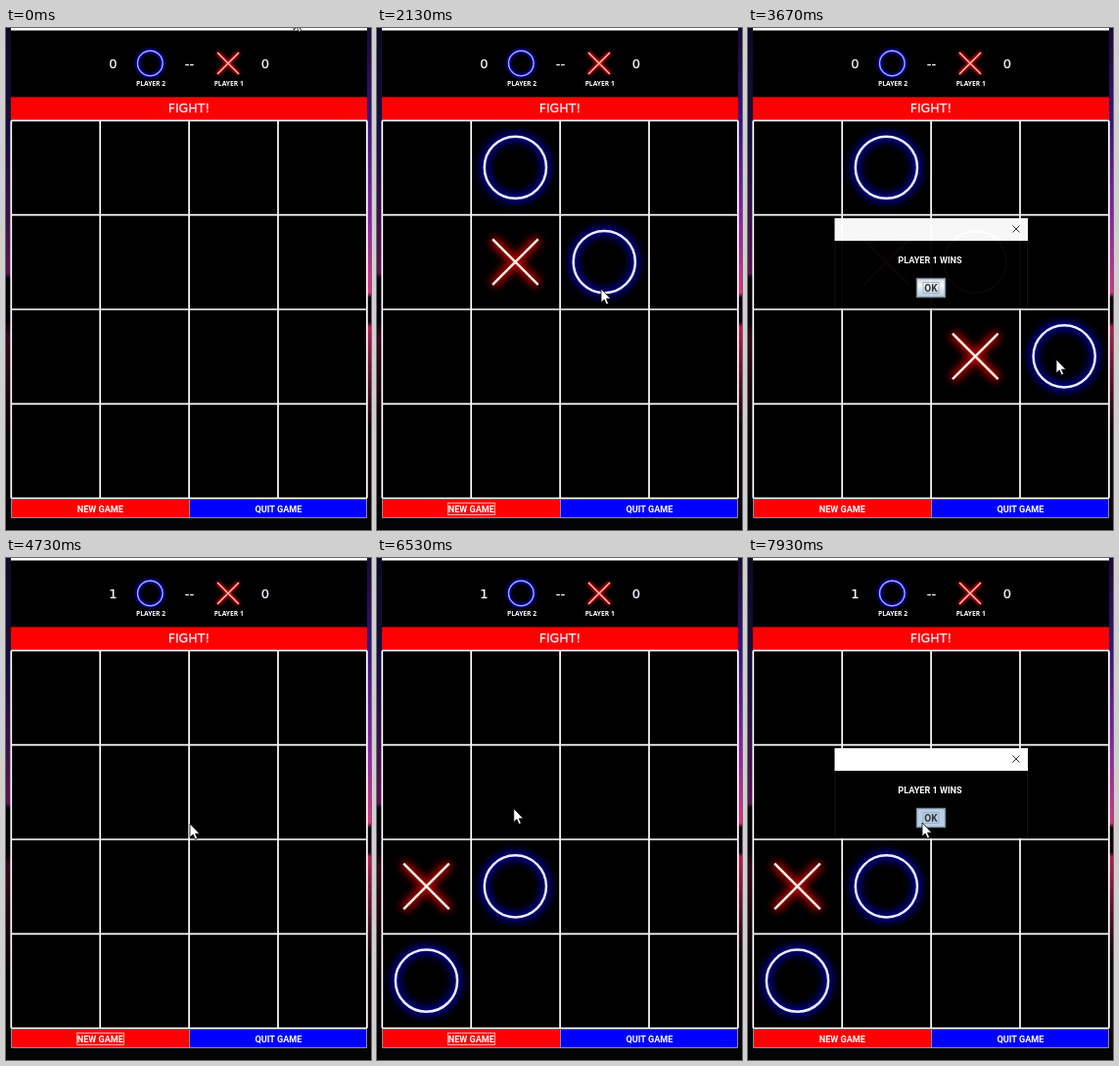
Write an HTML page that moves like this. It is 373 by 512 pixels and loops after 8 s.

```html
<!DOCTYPE html>
<html lang="en">
<head>
<meta charset="utf-8">
<title>Neon tic-tac-toe</title>
<style>
  html, body { margin: 0; width: 100%; height: 100%; overflow: hidden; background: #000; }
  svg { display: block; width: 373px; height: 512px; }
  text { fill: #fff; text-anchor: middle; font: bold 9.1px Roboto, sans-serif; }
  .big { font: 13px "DejaVu Sans", sans-serif; fill: #f2f2ff; stroke: #f2f2ff; stroke-width: .25; }
  .tag { font: bold 6.7px "Open Sans", sans-serif; }
  .line { fill: none; stroke-width: 2.5; }
  .halo { fill: none; stroke-width: 9; filter: url(#blur); }
  .O .line { stroke: #ececff; }
  .O .halo { stroke: #00009c; }
  .X .line { stroke: #fff0ea; }
  .X .halo { stroke: #b80000; }
  .icon .line { stroke-width: 1.4; }
  .icon .halo { stroke-width: 4; filter: url(#soft); }
  .icon.O .line { stroke: #a8a8ff; }
  .icon.O .halo { stroke: #0000c8; }
  .icon.X .line { stroke: #ffc4c0; }
  .icon.X .halo { stroke: #d80000; }
</style>
</head>
<body>
<svg viewBox="0 0 373 512">
  <defs>
    <filter id="blur" x="-50%" y="-50%" width="200%" height="200%"><feGaussianBlur stdDeviation="4"/></filter>
    <filter id="soft" x="-50%" y="-50%" width="200%" height="200%"><feGaussianBlur stdDeviation="1.8"/></filter>
    <linearGradient id="left" x2="0" y2="1">
      <stop offset="0" stop-color="#0c0a26"/><stop offset=".25" stop-color="#1b0e42"/>
      <stop offset=".5" stop-color="#5a1450"/><stop offset=".51" stop-color="#050208"/>
      <stop offset=".6" stop-color="#08030a"/><stop offset=".63" stop-color="#34081c"/>
      <stop offset=".85" stop-color="#050306"/>
    </linearGradient>
    <linearGradient id="right" x2="0" y2="1">
      <stop offset="0" stop-color="#170a34"/><stop offset=".2" stop-color="#3c1480"/>
      <stop offset=".4" stop-color="#9420ae"/><stop offset=".54" stop-color="#e0307c"/>
      <stop offset=".55" stop-color="#0a0308"/><stop offset=".6" stop-color="#10040a"/>
      <stop offset=".61" stop-color="#b81a50"/><stop offset=".82" stop-color="#0c0408"/>
    </linearGradient>
    <linearGradient id="metal" x2="0" y2="1">
      <stop offset="0" stop-color="#d4e0ec"/><stop offset=".35" stop-color="#fff"/>
      <stop offset="1" stop-color="#b8cfe5"/>
    </linearGradient>
  </defs>

  <rect width="373" height="512" fill="#040306"/>
  <rect width="5" height="500" fill="url(#left)"/>
  <rect x="369" width="4" height="500" fill="url(#right)"/>
  <rect x="5" width="364" height="500"/>
  <rect x="5" width="364" height="2.5" fill="#fff"/>

  <g id="icons"></g>
  <text id="score" class="big" x="109.5" y="41.3">0</text>
  <text class="big" x="187.5" y="41.3">--</text>
  <text class="big" x="265" y="41.3">0</text>
  <text class="tag" x="148" y="59.4">PLAYER 2</text>
  <text class="tag" x="227.7" y="59.4">PLAYER 1</text>
  <rect x="5" y="70.4" width="364" height="23" fill="#f00"/>
  <text class="big" x="187" y="86.4" style="font-size:12.5px">FIGHT!</text>

  <path id="grid" fill="none" stroke="#fff" stroke-width="1.7"/>
  <rect x="5.5" y="481" width="181.5" height="18" fill="#f00"/>
  <rect x="187" y="481" width="181.5" height="18" fill="#00f"/>
  <path d="M5.5 480V499.5H368.5V480M187.5 481V499" fill="none" stroke="#8c8c96"/>
  <text x="96.3" y="494">NEW GAME</text>
  <text x="278.5" y="494">QUIT GAME</text>
  <rect id="focus" x="72.5" y="484.5" width="48" height="12" fill="none" stroke="#ffb4b4" stroke-width=".9"/>

  <g id="board"></g>

  <g id="dialog">
    <rect x="88.5" y="194" width="197.5" height="92"/>
    <path d="M89 217V285.5H285.5V217" fill="none" stroke="#141414"/>
    <rect x="88.5" y="194" width="197.5" height="23" fill="#fff"/>
    <path d="M270.5 201.5l7 7m0-7l-7 7" stroke="#333"/>
    <text x="186" y="240.3">PLAYER 1 WINS</text>
    <rect id="ok" x="172.5" y="255.5" width="29" height="19" stroke="#7a8a99" stroke-width="1.4"/>
    <rect x="179" y="259.5" width="16" height="11" fill="none" stroke="#8faacb" stroke-width=".8"/>
    <text x="187" y="268.8" style="font-size:10px;fill:#333">OK</text>
  </g>
  <path id="cursor" d="M0 0V14L3.2 11L5.4 16L7.6 15L5.5 10.2H9.8Z" fill="#fff" stroke="#000" stroke-width=".8"/>
</svg>

<script>
const FPS = 15, TICKS = 120;
const LEFT = 5.3, TOP = 94.4, CELL_W = 90.9, CELL_H = 96.3;
const $ = id => document.getElementById(id);

let lines = '';
for (let i = 0; i <= 4; i++) {
  lines += `M${LEFT} ${TOP + i * CELL_H}h${4 * CELL_W}M${LEFT + i * CELL_W} ${TOP}v${4 * CELL_H}`;
}
$('grid').setAttribute('d', lines);

function mark(kind, x, y, s, parent, extra = '') {
  const g = document.createElementNS('http://www.w3.org/2000/svg', 'g');
  const shape = cls => kind === 'O'
    ? `<circle class="${cls}" r="${s}"/>`
    : `<path class="${cls}" d="M${-s} ${-s}L${s} ${s}M${s} ${-s}L${-s} ${s}"/>`;
  g.setAttribute('class', `${kind} ${extra}`);
  g.setAttribute('transform', `translate(${x} ${y})`);
  g.innerHTML = shape('halo') + shape('line');
  parent.append(g);
  return g;
}

mark('O', 147.3, 36, 12.8, $('icons'), 'icon');
mark('X', 227, 36, 11, $('icons'), 'icon');

// Times are in ticks. Clicks come at an even pace; O and X take turns.
const games = [
  { enter: 2, start: 14.6, step: 8.9, okAt: 63, close: 66, ok: [188, 271],
    clicks: [[125, 157], [148, 237], [229, 266], [240, 332], [315, 338]] },
  { enter: 71, start: 80.3, step: 6.75, okAt: 116, close: 121, ok: [178, 270],
    clicks: [[58, 430], [64, 352], [134, 350], [140, 251], [201, 242]] }
];

const legs = [], pieces = [];
for (const g of games) {
  g.clicks.forEach(([x, y], i) => {
    const time = g.start + i * g.step, kind = i % 2 ? 'X' : 'O';
    const col = Math.floor((x - LEFT) / CELL_W), row = Math.floor((y - TOP) / CELL_H);
    const el = mark(kind, LEFT + (col + .497) * CELL_W, TOP + (row + .497) * CELL_H,
      kind === 'O' ? 31.6 : 23.3, $('board'));
    pieces.push({ el, on: time - .5, off: g.close });
    legs.push({ x, y,
      leave: i ? time - .9 * g.step : g.enter,
      arrive: i ? time - .3 * g.step : g.start - 1 });
    g.won = time;
  });
  legs.push({ x: g.ok[0], y: g.ok[1], leave: g.okAt - 7, arrive: g.okAt });
}

const ramp = (n, a, b) => Math.min(1, Math.max(0, (n - a) / (b - a)));
const ease = u => u * u * (3 - 2 * u);
const within = (n, a, b) => n >= a && n < b;
const show = (el, on) => { el.style.display = on ? '' : 'none'; };

function pointer(n) {
  return legs.reduce(([x, y], leg) => {
    const u = ease(ramp(n, leg.leave, leg.arrive));
    return [x + (leg.x - x) * u, y + (leg.y - y) * u];
  }, [294, -12]);
}

function draw(ms) {
  const n = Math.floor((ms + 6) * FPS / 1000) % TICKS;
  $('cursor').setAttribute('transform', `translate(${pointer(n)})`);
  pieces.forEach(p => show(p.el, within(n, p.on, p.off)));
  $('dialog').style.opacity = Math.max(...games.map(g =>
    ramp(n, g.won + 1.9, g.won + 4.9) * (1 - ramp(n, g.close, g.close + 2))));
  show($('focus'), n >= games[0].start && !games.some(g => within(n, g.won + .5, g.close + 1)));
  $('ok').setAttribute('fill',
    games.some(g => within(n, g.close - 2, g.close + 2)) ? '#b8cfe5' : 'url(#metal)');
  $('score').textContent = n < games[0].close ? '0' : '1';
}

const start = performance.now();
function loop() {
  draw(performance.now() - start);
  requestAnimationFrame(loop);
}
draw(0);
requestAnimationFrame(loop);
</script>
</body>
</html>
```
